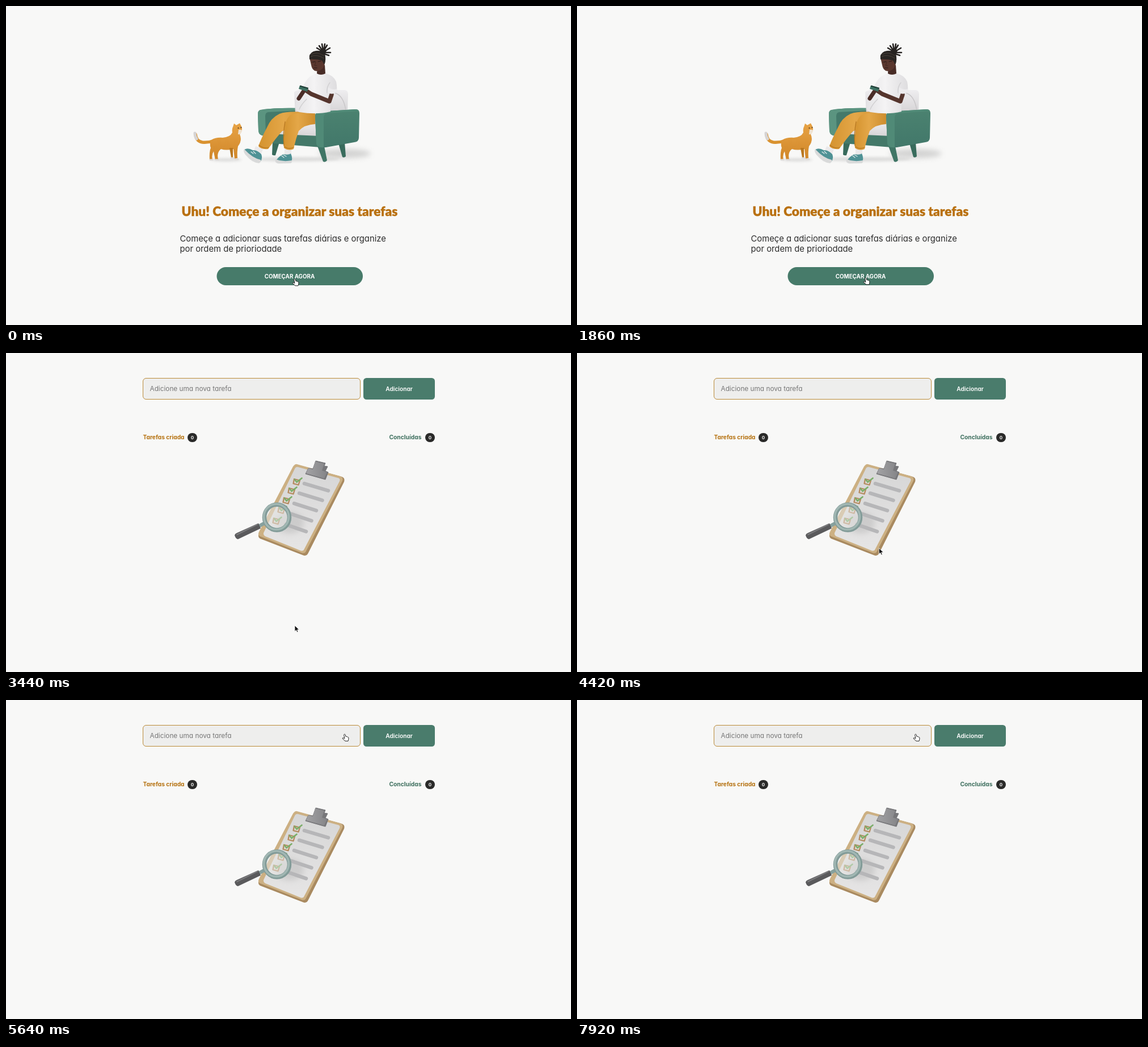
An HTML page for the animation above (8000 ms loop, 996x562 px).

```html
<!DOCTYPE html>
<html lang="pt">
<head>
<meta charset="utf-8">
<title>Tarefas</title>
<style>
  html, body { margin: 0; width: 100%; height: 100%; overflow: hidden; background: #f8f8f7; }
  svg { display: block; width: 100vw; height: 100vh; }
  text { font-family: Inter, "Open Sans", sans-serif; font-feature-settings: "cv11"; text-anchor: middle; }
  .title { font: 900 22.7px Lato, sans-serif; fill: #b9700f; stroke: #b9700f; stroke-width: .4; stroke-linejoin: round; }
  .copy { font-size: 14.8px; fill: #2b2b2b; text-anchor: start; }
  .bold { font-weight: 700; }
  .limb { fill: none; stroke-linecap: round; stroke-linejoin: round; }
</style>
</head>
<body>
<svg viewBox="0 0 996 562">
  <defs>
    <filter id="soft" x="-30%" y="-80%" width="160%" height="260%"><feGaussianBlur stdDeviation="5"/></filter>
    <filter id="faint" x="-30%" y="-80%" width="160%" height="260%"><feGaussianBlur stdDeviation="2"/></filter>
    <linearGradient id="shirt"><stop stop-color="#e4e3e5"/><stop offset=".45" stop-color="#f4f3f4"/><stop offset="1" stop-color="#dedddf"/></linearGradient>
    <linearGradient id="cushion" x2="0" y2="1"><stop stop-color="#eeedef"/><stop offset="1" stop-color="#d5d3d5"/></linearGradient>
    <linearGradient id="green" x2="0" y2="1"><stop stop-color="#4b8270"/><stop offset="1" stop-color="#42786a"/></linearGradient>
    <linearGradient id="pants"><stop stop-color="#d4932f"/><stop offset=".45" stop-color="#e4a748"/><stop offset="1" stop-color="#cd8d2e"/></linearGradient>
    <linearGradient id="fur" x2="0" y2="1"><stop stop-color="#e7a345"/><stop offset="1" stop-color="#d08628"/></linearGradient>
    <linearGradient id="paper" x2="0" y2="1"><stop stop-color="#d6d6d6"/><stop offset="1" stop-color="#e6e5e5"/></linearGradient>
    <linearGradient id="metal"><stop stop-color="#a2a2a4"/><stop offset="1" stop-color="#858588"/></linearGradient>
  </defs>

  <g id="welcome">
    <ellipse cx="597" cy="260" rx="46" ry="8" fill="#8c8c8c" opacity=".34" filter="url(#soft)"/>
    <ellipse cx="510" cy="270" rx="78" ry="4" fill="#a0a0a0" opacity=".3" filter="url(#faint)"/>
    <ellipse cx="388" cy="271" rx="27" ry="3" fill="#909090" opacity=".25" filter="url(#faint)"/>

    <!-- cat -->
    <path class="limb" d="M334 226 Q335 238 346 240 Q357 241 368 237" stroke="#d9922f" stroke-width="5.500"/>
    <path class="limb" d="M333 224 Q333 230 336 234" stroke="#d6d4d4" stroke-width="5"/>
    <path d="M362 236 Q370 231 382 232 Q395 231 399 223 Q398 216 400 213 L402 207 L406 210 L412 206.500 L415 212 Q418 220 412 226 Q417 237 409 247 Q407 257 408 268 L403 269 L401 252 Q388 255 379 252 Q371 258 374 270 L369 271 Q367 262 366 256 Q362 262 364 271 L359 271 Q358 257 361 250 Q358 242 362 236Z" fill="url(#fur)"/>
    <path d="M394 250 L397 267 L400 267 L400 250Z" fill="#b9771f"/>
    <path d="M410 218 Q417 217 416 221 Q413 227 409 226Z" fill="#efe3d2"/>
    <circle cx="409.500" cy="215" r="1" fill="#473321"/><circle cx="414.500" cy="214" r="1" fill="#473321"/>
    <path class="limb" d="M360 271 H364 M370 271 H375 M397 268 H401 M404 270 H409" stroke="#dfdcd9" stroke-width="3"/>

    <!-- armchair -->
    <path d="M470 238 L482 240 L475 263 Q472 264 469 262Z M586 242 L597 240 L599 265 Q596 268 593 266Z" fill="#386b5c"/>
    <path d="M548 244 L561 247 L566 272 Q563 276 559 274Z" fill="#3f7565"/>
    <path d="M449 183 Q475 179 520 180 L522 230 L455 229 Q446 228 445 220 L444 190 Q444 184 449 183Z" fill="#44796a"/>
    <path d="M449 183 Q475 179 514 180 L514 184 L462 187 Q457 188 457 194 L458 229 L453 228 Q446 228 445 220 L444 190 Q444 184 449 183Z" fill="#5b9480"/>
    <path d="M508 152 Q511 148 520 148 L597 148 Q603 149 603 155 L602 188 L510 190Z" fill="url(#cushion)"/>
    <path d="M579 153 Q595 157 599 184" class="limb" stroke="#c9c7c9" stroke-width="1.500"/>
    <path d="M500 204 L550 205 L550 231 L480 228Z" fill="url(#cushion)"/>
    <path d="M462 225 L552 229 L555 249 L470 242Z" fill="#447969"/>
    <path d="M552 186 L616 182 Q623 182 623 189 L622 232 Q622 239 614 240 L564 249 Q549 250 547 243 L545 194 Q545 187 552 186Z" fill="url(#green)"/>
    <path d="M552 186 L616 182 Q621 182 622 185 L566 189 Q560 190 560 196 L560 249 Q549 250 547 243 L545 194 Q545 187 552 186Z" fill="#508a77"/>

    <!-- shoes and legs -->
    <path d="M440 247 L453 252 L449 263 L436 257Z M491 250 L503 252 L503 264 L491 263Z" fill="#eae9ea"/>
    <path d="M420 253 Q426 249 435 254 Q442 253 450 261 Q453 269 448 275 Q433 270 420 253Z M477 271 Q481 265 489 261 Q498 263 502 260 Q506 268 503 274 L482 276Z" fill="#4f9295"/>
    <path d="M420 252 Q417 257 424 264 Q434 276 446 277 Q450 275 449 271 Q434 268 420 252Z M475 270 Q473 276 480 277.500 L502 277 Q505 275 504 272 Q488 275 475 270Z" fill="#d9dada"/>
    <path d="M432 257 L436 260 M436 256 L440 260 M486 264 L490 267 M489 262 L494 265" class="limb" stroke="#dfeaea" stroke-width="1.200"/>
    <path d="M545 189 Q500 183 482 190 Q467 197 460 214 Q449 235 445 247 Q449 253 462 252 Q474 235 486 221 L516 208 L545 208Z" fill="url(#pants)"/>
    <path d="M545 188 Q512 186 500 193 Q491 203 491 219 Q489 239 490 250 Q498 256 507 252 Q510 237 516 220 Q526 209 545 208Z" fill="url(#pants)"/>
    <path d="M492 204 Q488 225 490 246" class="limb" stroke="#b97921" stroke-width="1.400"/>
    <path d="M446 245 Q454 252 463 249 M491 248 Q499 253 507 249" class="limb" stroke="#b97820" stroke-width="1.300"/>

    <!-- torso, arms and phone -->
    <path d="M544 120 Q553 117 564 119 Q577 122 582 133 Q584 142 583 152 L574 154 Q571 172 572 186 Q548 192 517 187 Q507 184 511 170 Q516 157 522 148 Q528 126 544 120Z" fill="url(#shirt)"/>
    <path d="M571 135 Q565 142 566 153 M530 164 Q520 174 517 182" class="limb" stroke="#d1d0d2" stroke-width="1.500"/>
    <path class="limb" d="M574 156 L570 168 L538 155 L529 149" stroke="#55352d" stroke-width="7.500"/>
    <path class="limb" d="M516 163 L524 151" stroke="#4a2d27" stroke-width="7"/>
    <path d="M568 143 Q576 149 583 146 L583 152 Q576 157 567 153Z" fill="#ecebed"/>
    <path d="M518 140 L533 144 L531 151 L516 146Z" fill="#3c7061"/>
    <path d="M519 141 L532 145" class="limb" stroke="#223e37" stroke-width="2"/>

    <!-- head -->
    <path d="M549 107 L562 104 L563 119 Q555 123 548 119Z" fill="#472b25"/>
    <path d="M535 91 Q547 84 562 90 Q564 101 559 109 Q552 117 544 114 Q539 111 538 104Z" fill="#5a372e"/>
    <path d="M535 94 Q533 84 542 80 Q555 76 562 84 Q565 95 561 103 L557 96 Q547 93 535 94Z" fill="#292522"/>
    <path d="M538 85 Q549 80 560 87 M537 89 Q548 84 560 92" class="limb" stroke="#494139"/>
    <circle cx="559" cy="80" r="5.500" fill="#262321"/>
    <path class="limb" d="M558 80 L548 74 M558 79 L552 70 M559 79 L557 67 M560 79 L562 67 M560 79 L566 69 M561 80 L571 74 M560 82 L572 82 M560 84 L569 87" stroke="#262321" stroke-width="2.600"/>
    <path d="M540 99 L545 98 M550 98 L555 97 M543 109 L548 109" class="limb" stroke="#2a1b18" stroke-width="1.200"/>
    <path d="M546 99 L544 105 L548 105" class="limb" stroke="#432720"/>

    <text class="title" x="500" y="370">Uhu! Começe a organizar suas tarefas</text>
    <text class="copy" x="306.500" y="415">Começe a adicionar suas tarefas diárias e organize</text>
    <text class="copy" x="306.500" y="433">por ordem de prioriodade</text>
    <rect x="371.500" y="460" width="257.500" height="32" rx="16" fill="#477b6a"/>
    <text class="bold" x="500" y="479.500" font-size="9.800" fill="#fff">COMEÇAR AGORA</text>
  </g>

  <g id="tasks">
    <rect x="241.500" y="44.500" width="383" height="37" rx="5.500" fill="#eeeeed" stroke="#bb8b39"/>
    <text x="325.500" y="67.300" font-size="11.800" fill="#777">Adicione uma nova tarefa</text>
    <rect x="630" y="44" width="126" height="38" rx="5.500" fill="#4a7c6c"/>
    <text x="693" y="66.500" font-size="10.200" font-weight="600" fill="#fff">Adicionar</text>
    <text class="bold" x="278" y="152.300" font-size="10.200" fill="#b5710f">Tarefas criada</text>
    <text class="bold" x="704" y="152.300" font-size="10.300" fill="#3f705f">Concluídas</text>
    <g fill="#2a2a29"><rect x="320" y="141" width="17" height="16" rx="8"/><rect x="739" y="141" width="17" height="16" rx="8"/></g>
    <g class="bold" font-size="8" fill="#eee"><text x="328.500" y="152">0</text><text x="747.500" y="152">0</text></g>

    <!-- clipboard -->
    <path d="M514 197 L592 218 Q598 220 596 227 L533 352 Q530 359 523 356 L448 327 Q443 324 446 318 L507 201 Q510 196 514 197Z" fill="#a98a60"/>
    <path d="M513 196 L589 217 Q595 219 593 225 L529 349 Q527 354 521 352 L448 323 Q443 321 446 315 L506 200 Q509 195 513 196Z" fill="#ccb083"/>
    <path d="M515 201 L585 220 Q590 221 588 226 L526 345 Q524 350 519 348 L457 323 Q452 320 455 315 L509 204 Q511 200 515 201Z" fill="url(#paper)"/>
    <ellipse cx="500" cy="299" rx="25" ry="19" fill="#999" opacity=".28" filter="url(#soft)"/>
    <g id="rows"></g>
    <path d="M546 190 L563 194 L561 199 L567 200 L563 208 L568 210 L563 223 L528 213 L533 203 L541 204Z" fill="#77777a" stroke="#77777a" stroke-linejoin="round"/>
    <path d="M545 191 L561 195 L557 207 L566 210 L561 221 L529 212 L533 203 L541 205Z" fill="url(#metal)"/>

    <!-- magnifier -->
    <path class="limb" d="M457 299 L446 305" stroke="#87a19e" stroke-width="6"/>
    <path d="M445 300 L449 309 L409 328 Q405 328 403 321 Q404 318 407 317Z" fill="#5a5a5c"/>
    <path d="M443 302 L407 320" class="limb" stroke="#7b7b7d" stroke-width="2"/>
    <circle cx="478" cy="290" r="20" fill="#e8e8e6" opacity=".5"/>
    <ellipse cx="477.500" cy="289.500" rx="22" ry="22.500" fill="none" stroke="#829b98" stroke-width="7.500"/>
    <ellipse cx="476.500" cy="288.500" rx="22" ry="22.500" fill="none" stroke="#a1b7b3" stroke-width="3.500"/>
  </g>

  <g id="cursor">
    <path id="arrow" d="M0 0 V10.500 L2.500 8.200 L4.200 12 L6 11.200 L4.400 7.600 H7.800Z" fill="#111" stroke="#fff" stroke-width=".8"/>
    <path id="hand" d="M-1.300 1.300 Q-.8-.3 .4 .3 Q1 .6 1.200 1.400 L1.900 4.300 Q3 3.600 3.700 4.700 Q4.900 4.200 5.400 5.400 Q6.700 5.300 6.900 6.600 L6.800 9.500 L6 12.300 L1 12.300 L-3.800 8 Q-3.900 6.200-2.200 6.800 L-.1 8Z" fill="#fff" stroke="#222" stroke-linejoin="round"/>
  </g>
</svg>
<script>
  const $ = id => document.getElementById(id);
  const LOOP = 8000, SWITCH = 2200, OVER_INPUT = 4860;

  const row = (x, y, bx, by, i) => `
    <path class="limb" d="M${bx} ${by} l${42 - i * 1.5} 12.500" stroke="#b6b6b8" stroke-width="6.500"/>
    <path d="M${x - 5} ${y - 4} l10 2.500 -2.500 8 -9-2.500Z" fill="#d9d5cf" stroke="#b58b60" stroke-width="2.300" stroke-linejoin="round"/>
    <path class="limb" d="M${x - 4} ${y - 3} l3.500 4.500 9-7" stroke="#7aae68" stroke-width="2.600"/>`;
  $('rows').innerHTML = [
    [513, 226, 526, 230], [504, 242, 517, 247], [495, 259, 508, 265],
    [486, 276, 501, 283], [477, 295, 493, 302]
  ].map((r, i) => row(...r, i)).join('');

  // time, x, y of the pointer tip
  const path = [
    [0, 509, 480.500], [1820, 509, 480.500], [1860, 509, 478.500], [3400, 509, 478.500],
    [3600, 509, 486], [4240, 509, 486], [4420, 532, 344.500], [4620, 590, 185],
    [4780, 624, 92], [4920, 615, 66], [5160, 597, 60], [LOOP, 597, 60]
  ];

  function pointerAt(t) {
    const i = path.findIndex((p, n) => n && t <= p[0]);
    const [t0, x0, y0] = path[i - 1], [t1, x1, y1] = path[i];
    const k = (t - t0) / (t1 - t0);
    return [x0 + (x1 - x0) * k, y0 + (y1 - y0) * k];
  }

  const show = (id, on) => $(id).style.display = on ? '' : 'none';

  function draw(now) {
    const t = now % LOOP, welcome = t < SWITCH;
    const hand = welcome || t >= OVER_INPUT;
    show('welcome', welcome);
    show('tasks', !welcome);
    show('hand', hand);
    show('arrow', !hand);
    $('cursor').setAttribute('transform', `translate(${pointerAt(t)})`);
    requestAnimationFrame(() => draw(performance.now()));
  }
  draw(performance.now());
</script>
</body>
</html>
```
